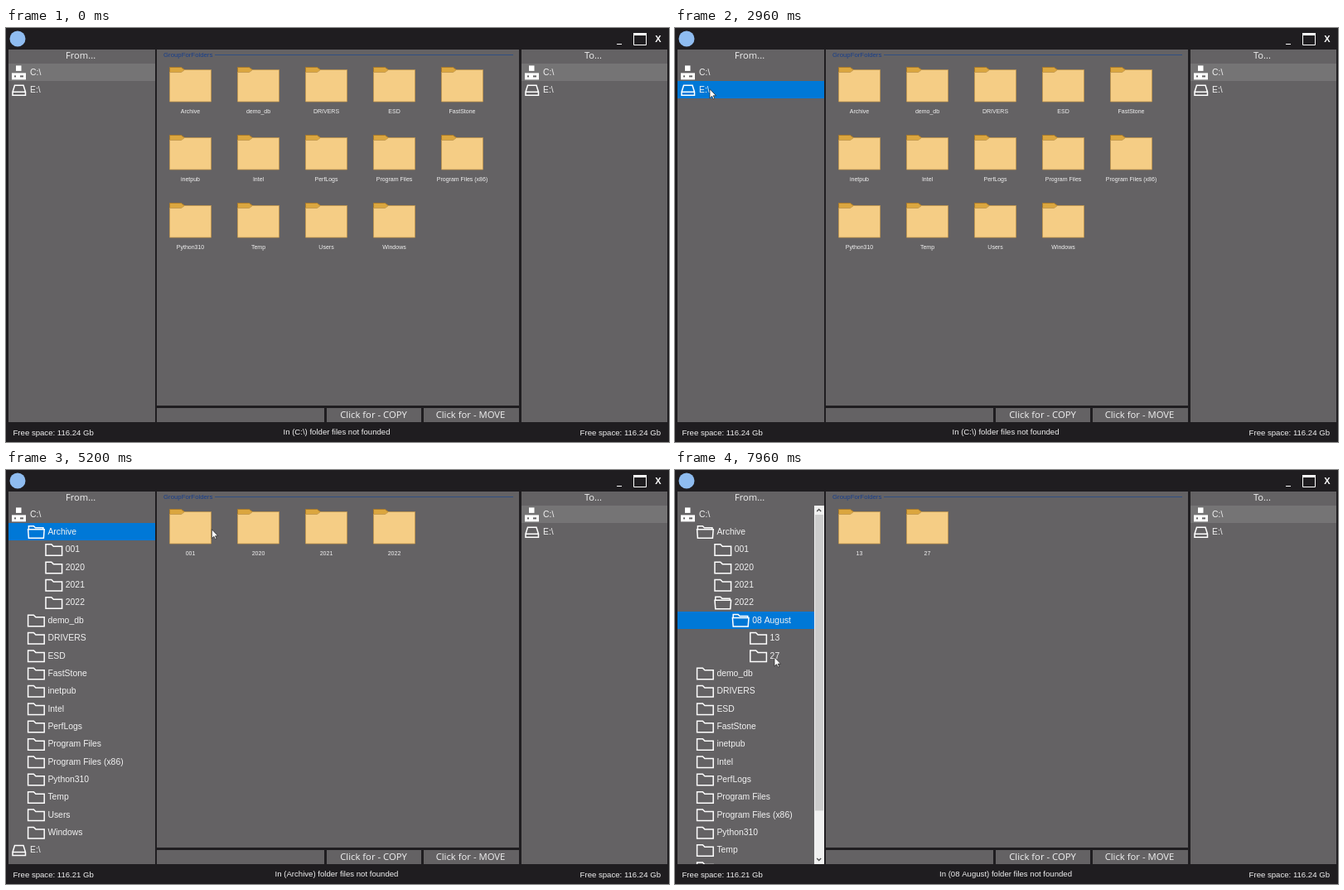
An HTML page with a canvas that plays this animation: 800 by 500 pixels, repeating every 8 s.

```html
<!DOCTYPE html>
<html lang="en">
<head>
<meta charset="utf-8">
<title>File manager</title>
<style>
html, body { margin: 0; width: 100%; height: 100%; overflow: hidden; background: #1f1d20; }
canvas { display: block; }
</style>
</head>
<body>
<canvas id="stage" width="800" height="500"></canvas>
<script>
const ctx = document.getElementById('stage').getContext('2d');
const LOOP = 8000, GLIDE = 440, UNFOLD = 160;
const TOP = 42.7, ROW = 21.35, INDENT = 21.4, BOTTOM = 476, VISIBLE_ROWS = 20;
const PANEL = '#646264', FRAME = '#1f1d20', INACTIVE = '#757475', ACTIVE = '#0078d7';
const SANS = '"Liberation Sans", Arial, sans-serif';
const UI = '"Open Sans", "Noto Sans", sans-serif';

const node = (name, children = [], opensAt = Infinity) => ({ name, children, opensAt });
const leaves = names => names.split(', ').map(name => node(name));

const august = node('08 August', leaves('13, 27'), 7000);
const year = node('2022', [august], 6160);
const archive = node('Archive', [...leaves('001, 2020, 2021'), year], 4440);
const driveC = node('C:\\', [archive, ...leaves('demo_db, DRIVERS, ESD, FastStone, inetpub, Intel, ' +
  'PerfLogs, Program Files, Program Files (x86), Python310, Temp, Users, Windows')], 4000);
const driveE = node('E:\\');

// The pointer glides to each stop and selects its node, if any, on arrival.
const rowY = row => TOP + (row + 0.45) * ROW;
const stops = [
  { start: 1500, x: 281, y: 322 },
  { start: 2040, x: 42, y: rowY(1), picks: driveE },
  { start: 3040, x: 41, y: rowY(0) - 4, picks: driveC },
  { start: 4000, x: 42, y: rowY(1) - 2, picks: archive },
  { start: 4800, x: 253, y: rowY(1) - 2 },
  { start: 5280, x: 76, y: rowY(5), picks: year },
  { start: 6440, x: 82, y: rowY(6) - 7, picks: august },
  { start: 7400, x: 120, y: rowY(8) + 3 },
];
const entry = { x: 420, y: 500 };
const FOCUS_AT = 1720;
const REFRESH_AT = stops[2].start + GLIDE;

const clamp = v => Math.max(0, Math.min(1, v));
const smooth = p => p * p * (3 - 2 * p);
const openness = (n, t) => clamp((t - n.opensAt) / UNFOLD);
const selectedAt = t => stops.findLast(s => s.picks && t >= s.start + GLIDE)?.picks ?? driveC;

function box(x, y, w, h, color) {
  ctx.fillStyle = color;
  ctx.fillRect(x, y, w, h);
}

function text(value, x, y, size, { align = 'left', color = '#f2f2f2', family = SANS, weight = '' } = {}) {
  ctx.font = `${weight} ${size}px ${family}`;
  ctx.textAlign = align;
  ctx.textBaseline = 'middle';
  ctx.fillStyle = color;
  ctx.fillText(value, x, y);
}

function icon(x, y, path, { fill, stroke, width = 1 }) {
  const outline = new Path2D(path);
  ctx.save();
  ctx.translate(x, y);
  if (fill) { ctx.fillStyle = fill; ctx.fill(outline); }
  if (stroke) { ctx.strokeStyle = stroke; ctx.lineWidth = width; ctx.stroke(outline); }
  ctx.restore();
}

const line = { stroke: '#fff', width: 1.5 };

function driveIcon(n, x, y) {
  if (n === driveE) {
    icon(x + 1, y + 2.5, 'M0 0 L2.5 -8 H13 L15.5 0 V4 H0 Z H15.5', line);
    return;
  }
  box(x + 5, y - 8, 6.5, 6.5, '#fff');
  box(x, y + 1, 17, 8, '#fff');
  box(x + 3, y + 4, 2, 2, PANEL);
  box(x + 10, y + 4, 4, 2, PANEL);
}

function treeFolder(x, y, open) {
  icon(x, y, open
    ? 'M1.5 -3 V-7 H7.5 L9.5 -5 H19 V-3 M.7 -3 H20.3 L19.5 7.5 H1.5 Z'
    : 'M.7 -6.3 H7.5 L10 -3.8 H20.3 V7.2 H.7 Z', line);
}

function treeRow(n, depth, left, y, open) {
  if (depth) treeFolder(left + 2.5 + depth * INDENT, y, open);
  else driveIcon(n, left + 5, y);
  text(n.name, left + 27 + depth * INDENT, y + 0.5, 10.4);
}

function highlight(x, y, w, color) {
  const top = Math.round(y);
  box(x, top, w, Math.round(y + ROW) - top, color);
}

const countRows = (n, t) =>
  1 + (openness(n, t) === 1 ? n.children.reduce((sum, c) => sum + countRows(c, t), 0) : 0);

function scrollBar(rows) {
  box(168, 43, 12, BOTTOM - 43, '#f0f0f0');
  box(169, 54, 10, 411 * VISIBLE_ROWS / rows, '#cdcdcd');
  const arrow = { stroke: '#505050', width: 1.3 };
  icon(173.7, 47.5, 'M-2.5 2.5 L0 0 L2.5 2.5', arrow);
  icon(173.7, 471.5, 'M-2.5 -2.5 L0 0 L2.5 -2.5', arrow);
}

function fromTree(t, selected) {
  const rows = countRows(driveC, t) + 1;
  const scrolls = rows > VISIBLE_ROWS;
  let y = TOP;

  const walk = (n, depth) => {
    const open = openness(n, t);
    // While a branch unfolds, its own area is blank and the rows below slide.
    const unfolding = open > 0 && open < 1;
    if (!unfolding) {
      if (n === selected) highlight(3, y, scrolls ? 165 : 177, t < FOCUS_AT ? INACTIVE : ACTIVE);
      treeRow(n, depth, 2, y + ROW / 2, open === 1);
    }
    y += ROW;
    if (open === 1) n.children.forEach(child => walk(child, depth + 1));
    else y += open * n.children.length * ROW;
  };

  ctx.save();
  ctx.beginPath();
  ctx.rect(3, 26, 177, BOTTOM - 26);
  ctx.clip();
  walk(driveC, 0);
  walk(driveE, 0);
  if (scrolls) scrollBar(rows);
  ctx.restore();
}

function bigFolder({ name }, i) {
  const x = 197.5 + i % 5 * 82, y = 47.5 + Math.floor(i / 5) * 82;
  icon(x, y, 'M0 0 H14 L18 3 V7 H0 Z', { fill: '#dba63f', stroke: '#a87a2c' });
  icon(x, y, 'M0 6 H14 L18 3 H50 V41.5 H0 Z', { fill: '#f5cd85', stroke: '#bf954c', width: 0.8 });
  text(name, x + 25, y + 54, 7, { align: 'center' });
}

function titleBar() {
  icon(14, 13, 'M-9.5 0 a9.5 9.5 0 1 0 19 0 a9.5 9.5 0 1 0 -19 0', { fill: '#8fbcf0' });
  box(737, 19, 6, 1, '#fff');
  icon(757.5, 6.5, 'M0 0 H15 V14 H0 Z', { stroke: '#fff' });
  box(757, 6, 16, 3, '#fff');
  text('X', 787, 13.5, 11, { align: 'center', weight: 'bold', color: '#fff' });
}

function pointer(t) {
  const i = stops.findLastIndex(s => t >= s.start);
  if (i < 0) return;
  const from = stops[i - 1] ?? entry, to = stops[i];
  const p = smooth(clamp((t - to.start) / GLIDE));
  icon(from.x + (to.x - from.x) * p, from.y + (to.y - from.y) * p,
    'M0 0 V11 L2.5 8.5 L4.2 12 L5.8 11.5 L4.2 8 H7.5 Z', { fill: '#fff', stroke: '#222', width: 0.7 });
}

function draw(t) {
  const selected = selectedAt(t);
  const shown = selected === driveE ? driveC : selected;
  const centered = { align: 'center', family: UI };

  box(0, 0, 800, 500, FRAME);
  titleBar();
  box(3, 26, 177, 450, PANEL);
  box(182, 26, 437, 430, PANEL);
  box(622, 26, 176, 450, PANEL);
  box(182, 459, 202, 17, PANEL);
  box(387, 459, 114, 17, PANEL);
  box(504, 459, 115, 17, PANEL);

  text('From...', 90, 34.5, 11.2, centered);
  text('To...', 708.5, 34.5, 11.2, centered);
  text('Click for - COPY', 443.5, 468, 11.3, centered);
  text('Click for - MOVE', 560.5, 468, 11.3, centered);

  text('GroupForFolders', 190, 33, 7.8, { color: '#183f8c' });
  box(252, 32, 360, 1, '#304f82');
  shown.children.forEach(bigFolder);

  fromTree(t, selected);
  highlight(622, TOP, 176, INACTIVE);
  [driveC, driveE].forEach((drive, i) => treeRow(drive, 0, 621, TOP + (i + 0.5) * ROW));

  text(`Free space: ${t < REFRESH_AT ? '116.24' : '116.21'} Gb`, 8.5, 489, 9.6);
  text(`In (${shown.name}) folder files not founded`, 399, 488.5, 9.6, { align: 'center' });
  text('Free space: 116.24 Gb', 790, 489, 9.6, { align: 'right' });
  pointer(t);
}

const start = performance.now();
function tick() {
  draw((performance.now() - start) % LOOP);
  requestAnimationFrame(tick);
}
tick();
</script>
</body>
</html>
```
